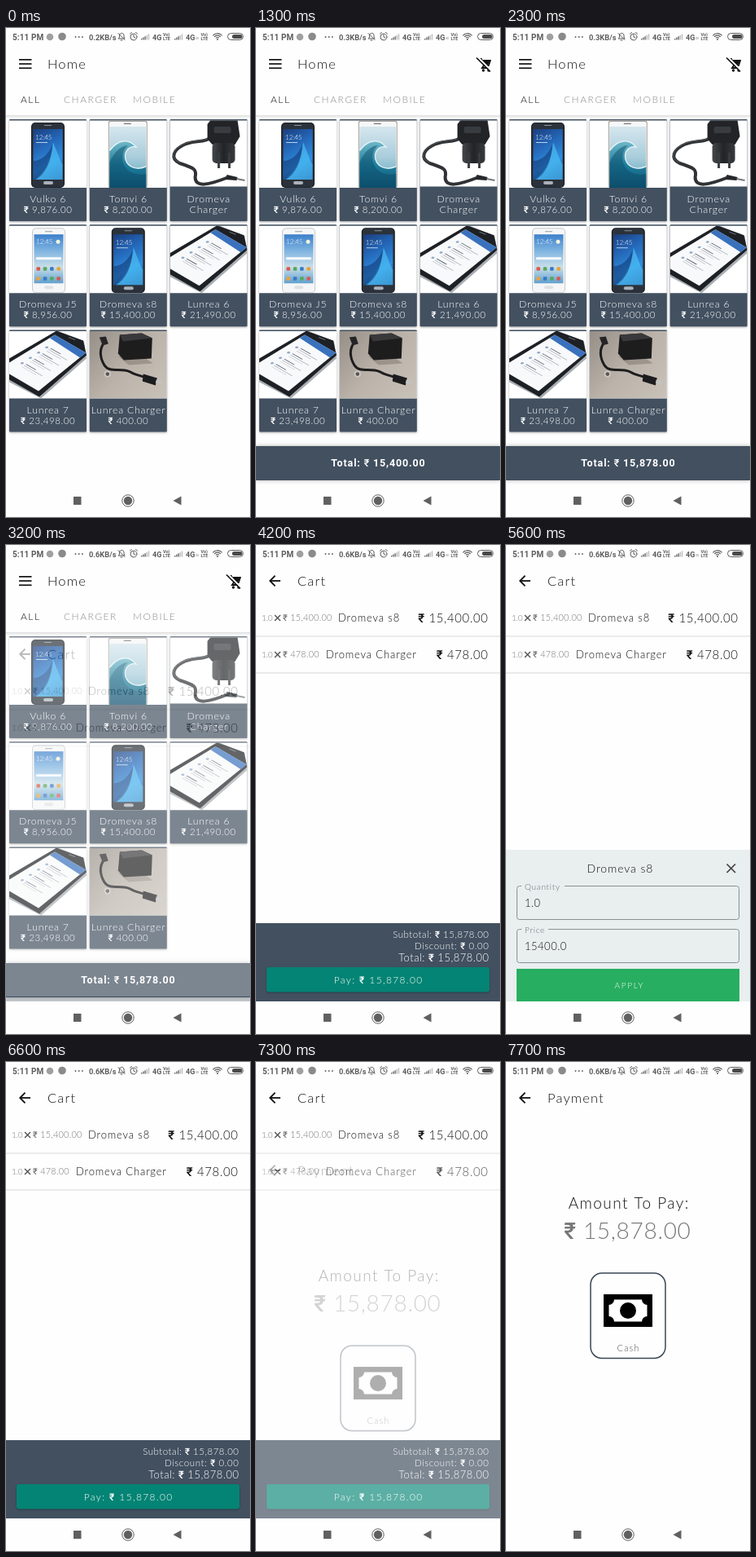
These frames come from a looping animation (300x600 px, 8 s). An HTML page with a canvas:

```html
<!DOCTYPE html>
<html lang="en">
<head>
<meta charset="utf-8">
<title>Shop checkout</title>
<style>
html, body { margin: 0; width: 100%; height: 100%; overflow: hidden; background: #fefefe; }
canvas { display: block; width: 300px; height: 600px; }
</style>
</head>
<body>
<canvas id="stage"></canvas>
<script>
const W = 300, H = 600, LOOP = 8000, TAU = Math.PI * 2;
const NAVY = '#425060', PAPER = '#fefefe', INK = '#111';
const scale = window.devicePixelRatio || 1;
const stage = document.getElementById('stage');
const pageLayer = document.createElement('canvas');
for (const c of [stage, pageLayer]) { c.width = W * scale; c.height = H * scale; }
const main = stage.getContext('2d');
let g = main;

const clamp = v => Math.max(0, Math.min(1, v));
const part = (t, a, b) => clamp((t - a) / (b - a));
const out = p => 1 - Math.pow(1 - p, 3);

// ---- drawing helpers ----
function rect(x, y, w, h, fill, r = 0) {
  g.fillStyle = fill;
  g.beginPath();
  g.roundRect(x, y, w, h, r);
  g.fill();
}
function frame(x, y, w, h, color, r, lw = 1) {
  g.strokeStyle = color;
  g.lineWidth = lw;
  g.beginPath();
  g.roundRect(x, y, w, h, r);
  g.stroke();
}
function disc(x, y, r, fill) {
  g.fillStyle = fill;
  g.beginPath();
  g.arc(x, y, r, 0, TAU);
  g.fill();
}
function poly(fill, ...p) {
  g.fillStyle = fill;
  g.beginPath();
  for (let i = 0; i < p.length; i += 2) g.lineTo(p[i], p[i + 1]);
  g.fill();
}
function line(color, lw, ...p) {
  g.strokeStyle = color;
  g.lineWidth = lw;
  g.beginPath();
  for (let i = 0; i < p.length; i += 2) g.lineTo(p[i], p[i + 1]);
  g.stroke();
}
function curve(color, lw, d) {
  g.strokeStyle = color;
  g.lineWidth = lw;
  g.lineCap = 'round';
  g.stroke(new Path2D(d));
  g.lineCap = 'butt';
}
function blob(fill, d) {
  g.fillStyle = fill;
  g.fill(new Path2D(d));
}
function shade(x0, y0, x1, y1, ...colors) {
  const f = g.createLinearGradient(x0, y0, x1, y1);
  colors.forEach((c, i) => f.addColorStop(i / (colors.length - 1), c));
  return f;
}
// The currency sign is set heavier than the light text around it.
function text(s, x, y, size, color, gap = 0.4, align = 'left', font = '300', face = 'Lato') {
  const light = `${font} ${size}px ${face}, sans-serif`;
  const heavy = `500 ${size}px Roboto, sans-serif`;
  const runs = s.split(/(₹)/).filter(Boolean).map(r => ({ r, font: r === '₹' ? heavy : light }));
  g.letterSpacing = gap + 'px';
  g.fillStyle = color;
  let w = -gap;
  for (const run of runs) {
    g.font = run.font;
    w += run.w = g.measureText(run.r).width;
  }
  if (align === 'center') x -= w / 2;
  if (align === 'right') x -= w;
  for (const run of runs) {
    g.font = run.font;
    g.fillText(run.r, x, y);
    x += run.w;
  }
}
const bold = (s, x, y, size, color, gap = 0, align = 'left') =>
  text(s, x, y, size, color, gap, align, '700', 'Roboto');
function clipTo(x, y, w, h, draw) {
  g.save();
  g.beginPath();
  g.rect(x, y, w, h);
  g.clip();
  draw();
  g.restore();
}
function ripple(t, start, x, y, radius, box, color) {
  const p = part(t, start, start + 350);
  if (p <= 0 || p >= 1) return;
  clipTo(...box, () => {
    g.globalAlpha = 0.2 * (1 - p);
    disc(x, y, radius * out(p), color);
    g.globalAlpha = 1;
  });
}

// ---- product pictures, drawn in a 95 x 83 box ----
function darkPhone() {
  rect(27, 3, 41, 80, '#15191f', 5);
  rect(28, 3.5, 39, 79, '#2b323b', 5);
  rect(29.5, 11, 36, 62, shade(30, 11, 64, 73, '#1b3f80', '#2467b8', '#2f8ede', '#1c4f9a'));
  blob('rgba(80,200,250,.6)', 'M32 73C44 62 52 49 54 27C60 42 63 52 65.5 54V73Z');
  blob('rgba(15,45,100,.5)', 'M29.5 50C40 50 48 42 53 30C52 52 44 66 33 73H29.5Z');
  text('12:45', 32, 24, 8, '#fff', 0);
  rect(33, 27, 14, 1, '#b9d2ea');
  rect(42, 75, 12, 4, '#aab1b9', 2);
  rect(43, 6, 9, 1, '#8b939c');
}
function whitePhone() {
  rect(28, 3, 41, 80, '#c4c9ce', 5);
  rect(29, 4, 39, 78, '#f5f6f7', 4);
  rect(30.5, 11, 36, 60, shade(0, 11, 0, 71, '#3d80cb', '#7fb4e0', '#c9dfe9', '#5f9fd0'));
  text('12:45', 33, 23, 8, '#fff', 0);
  disc(60, 20, 2.5, '#f4f3dc');
  rect(33, 39, 31, 3, 'rgba(255,255,255,.9)', 1);
  const hues = ['#e8a33d', '#3a78c2', '#58a85a', '#d85a4d'];
  hues.forEach((c, i) => {
    rect(33.5 + i * 8.3, 51, 4.5, 4.5, hues[3 - i], 1);
    rect(33.5 + i * 8.3, 63, 4.5, 4.5, c, 1);
  });
  rect(43, 74, 11, 4, '#dfe2e4', 2);
  rect(44, 7, 9, 1, '#999');
}
function wavePhone() {
  rect(23, 1, 48, 82, '#a89e92', 2);
  rect(24, 2, 46, 81, '#f5f7f8', 2);
  rect(24.5, 8, 45, 75, shade(0, 8, 0, 83, '#d5e6ee', '#a9cddb', '#4f9fb8'));
  blob(shade(0, 25, 0, 83, '#74bccb', '#1f7f9d', '#0f5573'),
    'M24.5 38C34 24 48 22 57 33C49 31 42 38 44 48C47 58 58 62 69.5 57V83H24.5Z');
  blob('rgba(10,70,100,.45)', 'M24.5 52C31 38 38 32 47 31C40 37 38 48 44 58C50 66 60 68 69.5 66V83H24.5Z');
  curve('rgba(240,250,252,.85)', 1.4, 'M25 37C35 24 48 22 57 33C49 31 42 38 44 48C47 58 58 62 69 57');
  rect(42, 4, 9, 1, '#666');
}
function wallCharger() {
  curve('#303235', 4, 'M50 22C40 28 35 24 20 29C3 36 0 47 12 53C31 59 33 61 31 70C31 83 47 80 72 70');
  curve('#54575b', 1, 'M49 21C40 27 35 23 20 28C2 35 -1 47 12 52');
  poly('#25272a', 70, 67, 83, 70, 82, 74, 68, 73);
  line('#777a7d', 2, 82, 72, 92, 74);
  poly('#222427', 46, 5, 50, 0, 83, 0, 86, 20, 80, 30, 52, 30, 46, 23);
  rect(52, 28, 28, 25, shade(52, 0, 80, 0, '#45484c', '#222427', '#37393c'), 5);
  line('#3a3d40', 3, 60, 40, 60, 59);
  line('#3a3d40', 3, 73, 40, 73, 59);
  rect(54, 8, 21, 8, '#383b3f', 2);
}
function tiltedPhone() {
  poly('#a9aeb2', 0, 36, 60, 0, 92, 13, 95, 34, 39, 83, 0, 63);
  poly('#1d2024', 0, 34, 58, 0, 91, 12, 95, 30, 37, 81, 0, 60);
  poly('#f8f9fa', 0, 39, 56, 5, 94, 27, 36, 74, 0, 53);
  poly('#3971bd', 50, 9, 56, 5, 94, 27, 87, 33);
  g.save();
  g.transform(0.87, 0.5, -0.84, 0.54, 46, 15);
  for (let i = 0; i < 4; i++) {
    const y = i * 12 + 3;
    disc(5, y + 2, 1.7, '#8da8c8');
    rect(9, y, 14, 1, '#606b7a');
    rect(9, y + 3, 26, 0.8, '#a9b0b8');
    rect(9, y + 6, 20, 0.8, '#c0c5ca');
  }
  g.restore();
  line('#70767c', 1, 73, 8, 81, 11);
}
function cableCharger() {
  rect(0, 0, 95, 83, shade(0, 0, 95, 83, '#958e86', '#bbb3aa', '#c9c2b9'));
  blob('rgba(60,52,47,.25)', 'M35 31L69 34L78 40L48 42Z');
  poly('#1e1d1e', 37, 5, 64, 3, 77, 9, 76, 34, 42, 36, 35, 28);
  poly('#39383a', 37, 5, 64, 3, 77, 9, 41, 13);
  curve('#1e1d1e', 3, 'M18 14C10 25 14 35 18 42C24 52 38 45 49 50C57 55 65 55 71 58');
  poly('#252426', 12, 8, 20, 7, 23, 16, 16, 18);
  poly('#1d1c1e', 66, 53, 83, 58, 81, 67, 65, 62);
  poly('#c3c3c2', 82, 60, 89, 62, 88, 66, 81, 64);
  disc(22, 53, 4, '#d0c9c2');
  disc(22, 53, 2.3, '#555');
}

const items = [
  ['Vulko 6', '9,876.00', darkPhone], ['Tomvi 6', '8,200.00', wavePhone],
  ['Dromeva', '', wallCharger], ['Dromeva J5', '8,956.00', whitePhone],
  ['Dromeva s8', '15,400.00', darkPhone], ['Lunrea 6', '21,490.00', tiltedPhone],
  ['Lunrea 7', '23,498.00', tiltedPhone], ['Lunrea Charger', '400.00', cableCharger]
];

function tile([name, price, picture], i) {
  const x = 4 + (i % 3) * 98.8, y = 112 + Math.floor(i / 3) * 129.3, mid = x + 47.3;
  const photo = price ? 82.5 : 81;
  g.save();
  g.shadowColor = 'rgba(0,0,0,.35)';
  g.shadowBlur = 2.5 * scale;
  g.shadowOffsetY = scale;
  rect(x, y, 95, 125, NAVY, 1);
  g.restore();
  rect(x, y + 1.5, 95, photo, '#fff');
  clipTo(x, y + 1.5, 95, photo, () => {
    g.translate(x, y + 1);
    picture();
  });
  text(name, mid, y + 102, 12.3, '#fff', 0.75, 'center');
  if (price) text('₹ ' + price, mid, y + 115, 11.5, '#fff', 0.55, 'center');
  else text('Charger', mid, y + 115, 12.3, '#fff', 0.75, 'center');
}

// ---- system bars ----
function signal(x) {
  for (let i = 0; i < 5; i++) rect(x + i * 2.2, 13 - i * 1.4, 1.4, 1.5 + i * 1.4, i < 3 ? '#666' : '#bbb');
}
function statusBar(t) {
  const c = '#5c5c5c';
  rect(0, 0, W, 22, PAPER);
  bold('5:11 PM', 8, 14.5, 10, c, 0.1);
  disc(54, 11, 4.3, '#a0a0a0');
  disc(69, 10.5, 4.8, '#8a8a8a');
  for (let i = 0; i < 3; i++) disc(85.5 + i * 4.2, 11, 0.9, c);
  const speed = t < 250 ? '0.2' : t < 3100 ? '0.3' : '0.6';
  bold(speed + 'KB/s', 102, 14.5, 9.3, c);
  curve(c, 1, 'M138.5 13H146L145 11V9C145 5.5 139.5 5.5 139.5 9V11L138.5 13M141 15H143M138 6.5L146 14.5');
  curve(c, 1, 'M161 11A4 4 0 1 1 153 11A4 4 0 1 1 161 11M157 8.5V11L159 12M152.5 7L154.5 5.5M161.5 7L159.5 5.5');
  signal(166);
  signal(207);
  for (const x of [180, 221]) bold('4G', x, 14.5, 9, c);
  for (const x of [193, 239.5]) {
    bold('Vo)', x, 9.5, 5.5, c);
    bold('LTE', x, 15, 5.5, c);
  }
  rect(233.5, 11, 1, 3, '#aaa');
  rect(235.5, 11, 1, 3, '#aaa');
  for (let i = 0; i < 3; i++) {
    g.strokeStyle = c;
    g.lineWidth = 1.2;
    g.beginPath();
    g.arc(260, 14, 2.5 + i * 2.4, Math.PI * 1.22, Math.PI * 1.78);
    g.stroke();
  }
  disc(260, 14, 1, c);
  frame(272.5, 6.5, 19, 8, c, 4);
  rect(278, 8, 12.5, 5, '#4a4a4a', 2.5);
}
function navBar() {
  rect(0, 560, W, 40, PAPER);
  rect(83, 575, 9.5, 10, '#606060');
  disc(150, 580, 5.2, '#606060');
  g.strokeStyle = '#606060';
  g.lineWidth = 1;
  g.beginPath();
  g.arc(150, 580, 7.2, 0, TAU);
  g.stroke();
  poly('#606060', 205.5, 580, 215.5, 574.5, 215.5, 585.5);
}
function header(title) {
  text(title, 51, 50, 16.5, INK, 1.15);
}
function backArrow() {
  line('#111', 1.8, 30, 44, 17.5, 44);
  line('#111', 1.8, 23.5, 37.7, 17.2, 44, 23.5, 50.3);
}

// ---- screens ----
function cartOff() {
  curve('#111', 1.8, 'M274 38H277L281 46H286L288 40H280M280 46L278 49H286');
  poly('#111', 279, 39, 288, 39, 285, 46, 281, 45);
  disc(279.5, 52, 1.7, '#111');
  disc(286, 52, 1.7, '#111');
  line(PAPER, 2, 272.5, 35.5, 289, 52);
  line('#111', 1.6, 271, 36.5, 288, 53.5);
}
function totalBar(t) {
  const p = out(part(t, 1000, 1290));
  if (!p) return;
  g.save();
  g.translate(0, 50 * (1 - p));
  g.shadowColor = 'rgba(0,0,0,.3)';
  g.shadowBlur = 5 * scale;
  rect(0, 513, W, 42, NAVY);
  g.shadowColor = 'transparent';
  bold(`Total: ₹ ${t < 2150 ? '15,400.00' : '15,878.00'}`, 150, 538, 12.5, '#fff', 0.85, 'center');
  g.restore();
  g.save();
  g.globalAlpha *= p;
  cartOff();
  g.restore();
}
function home(t) {
  rect(0, 22, W, 538, PAPER);
  for (let i = 0; i < 3; i++) rect(16, 38 + i * 5.2, 15.5, 1.7, '#111');
  header('Home');
  text('ALL', 18, 92, 12, '#111', 1.5);
  text('CHARGER', 71, 92, 12, '#8c8c8c', 1.5);
  text('MOBILE', 156, 92, 12, '#8c8c8c', 1.5);
  rect(0, 107, W, 4, shade(0, 107, 0, 111, '#dedede', PAPER));
  items.forEach(tile);
  ripple(t, 950, 150, 304, 80, [102.8, 241, 95, 125], '#fff');
  ripple(t, 1900, 249, 175, 80, [201.6, 112, 95, 125], '#777');
  totalBar(t);
}
function cartRow(y, price, name, nameX) {
  text('1.0', 7, y, 10, '#777', -0.2);
  line('#555', 1.4, 23, y - 7, 30, y);
  line('#555', 1.4, 30, y - 7, 23, y);
  text('₹ ' + price, 33, y, 10.8, '#777', 0.3);
  text(name, nameX, y + 1, 13, INK, 0.85);
  text('₹ ' + price, 285, y + 1.5, 15, '#111', 0.6, 'right');
  rect(0, y + 18.5, W, 1, '#dadada');
}
function cart(t) {
  rect(0, 22, W, 538, PAPER);
  backArrow();
  header('Cart');
  cartRow(93, '15,400.00', 'Dromeva s8', 101);
  cartRow(138, '478.00', 'Dromeva Charger', 86);
  ripple(t, 4700, 140, 90, 180, [0, 67, W, 45], '#777');
  rect(0, 464, W, 96, NAVY);
  text('Subtotal: ₹ 15,878.00', 286, 482, 11.5, '#fff', 0.5, 'right');
  text('Discount: ₹ 0.00', 286, 495.5, 11.5, '#fff', 0.6, 'right');
  text('Total: ₹ 15,878.00', 286, 510.5, 13, '#fff', 0.5, 'right');
  g.save();
  g.shadowColor = 'rgba(0,0,0,.3)';
  g.shadowBlur = 2 * scale;
  g.shadowOffsetY = scale;
  rect(13, 518, 274, 30.5, '#048474', 3);
  g.restore();
  text('Pay: ₹ 15,878.00', 150, 538, 12, '#fff', 1.35, 'center');
  ripple(t, 7050, 150, 533, 160, [13, 518, 274, 31], '#fff');
}
function field(y, label, value, gapEnd) {
  frame(13.5, y + 0.5, 273, 41, '#8b9091', 3);
  rect(19, y - 1, gapEnd - 19, 3, '#e9eeef');
  text(label, 23, y + 5, 10, '#666c6e', 0.75);
  text(value, 23, y + 26, 13, INK, 0.5);
}
function editSheet(t) {
  const p = out(part(t, 5330, 5590)) - Math.pow(part(t, 6200, 6590), 1.6);
  if (p <= 0) return;
  g.save();
  g.translate(0, 186 * (1 - p));
  rect(0, 374, W, 186, '#e9eeef');
  text('Dromeva s8', 140, 402, 14, INK, 0.9, 'center');
  line('#444', 1.7, 271.5, 391.5, 282, 402);
  line('#444', 1.7, 282, 391.5, 271.5, 402);
  field(418, 'Quantity', '1.0', 72);
  field(471, 'Price', '15400.0', 52);
  rect(13, 520, 274, 40, '#27ae60');
  text('APPLY', 151, 544, 10, '#fff', 1.7, 'center');
  g.restore();
}
function payment() {
  rect(0, 22, W, 538, PAPER);
  backArrow();
  header('Payment');
  text('Amount To Pay:', 150.5, 180, 19, INK, 1.45, 'center');
  text('₹ 15,878.00', 149, 217, 28, '#777', 0.7, 'center');
  frame(104, 259, 92, 104.5, '#3a4656', 14, 1.5);
  rect(120, 285, 60, 40, '#000');
  rect(126.5, 291.5, 47, 27, '#fff');
  for (const x of [126.5, 173.5]) for (const y of [291.5, 318.5]) disc(x, y, 6.5, '#000');
  disc(150, 305, 10, '#000');
  text('Cash', 150, 355, 11, '#555', 1.1, 'center');
}

// Incoming page rises and fades in as one layer.
function enter(draw, t, start, end) {
  const p = out(part(t, start, end));
  if (p <= 0) return;
  if (p >= 1) return draw(t);
  g = pageLayer.getContext('2d');
  g.setTransform(scale, 0, 0, scale, 0, 0);
  g.clearRect(0, 0, W, H);
  draw(t);
  g = main;
  g.globalAlpha = p;
  g.drawImage(pageLayer, 0, 130 * (1 - p), W, H);
  g.globalAlpha = 1;
}

function render(t) {
  g.setTransform(scale, 0, 0, scale, 0, 0);
  rect(0, 0, W, H, PAPER);
  clipTo(0, 22, W, 538, () => {
    if (t < 3600) home(t);
    enter(cart, t, 3150, 3590);
    editSheet(t);
    enter(payment, t, 7250, 7680);
  });
  statusBar(t);
  navBar();
}

const began = performance.now();
function tick() {
  render((performance.now() - began) % LOOP);
  requestAnimationFrame(tick);
}
tick();
</script>
</body>
</html>
```
